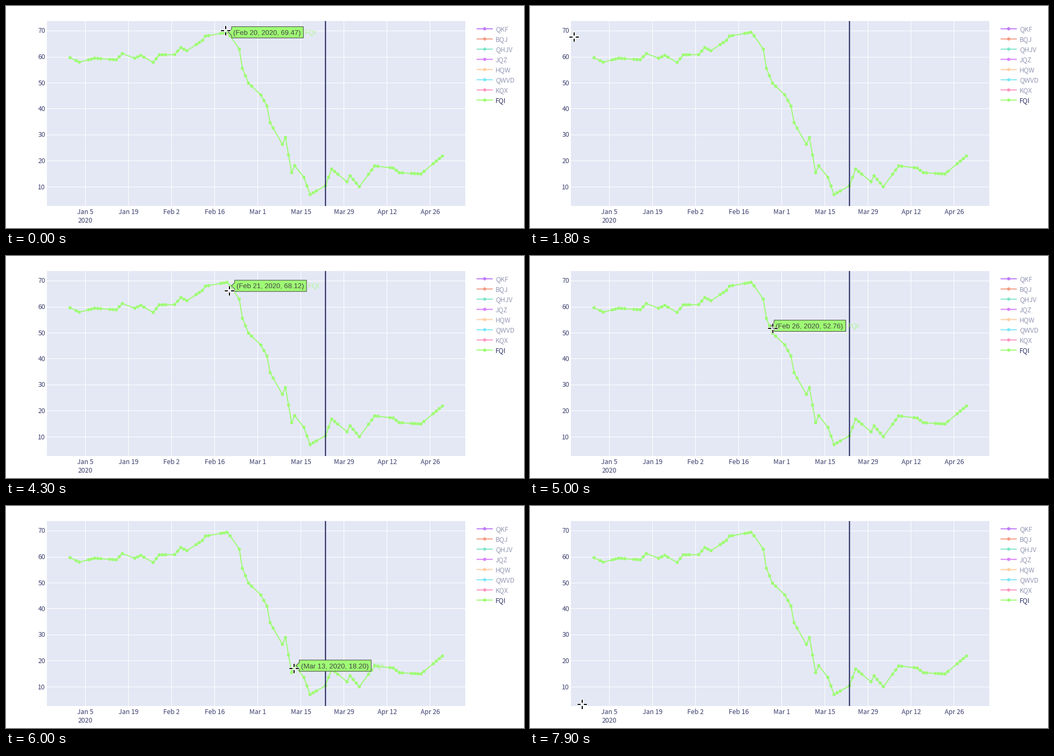
These frames come from a looping animation (962 by 414 pixels, 8000 ms). A matplotlib script:

```python
import math
import numpy as np
import matplotlib.pyplot as plt
from matplotlib.animation import FuncAnimation
from matplotlib.patches import Circle, Polygon, Rectangle

W, H, DPI = 962, 414, 64
PT = 72 / DPI  # points per pixel
LEFT, RIGHT, TOP, BOTTOM = 76, 853, 28, 373

GREEN, NAVY, INK = "#9ffb74", "#1f2259", "#3b3f6e"
AXIS_FONT, HOVER_FONT = "Noto Sans CJK JP", "Liberation Sans"
MONTHS = [("Dec", -30), ("Jan", 0), ("Feb", 31), ("Mar", 60), ("Apr", 91)]
SERIES = [("QKF", "#bf7bf8"), ("BQJ", "#f29d85"), ("QHJV", "#80e5cb"),
          ("JQZ", "#d880fb"), ("HQW", "#ffcfa3"), ("QWVD", "#7ce6f5"),
          ("KQX", "#fb97c4"), ("FQI", GREEN)]

# Turning points of the price as (day, price); day 0 is Dec 31
TURNS = [(0, 59.7), (3, 58), (8, 59.5), (15, 58.9), (17, 61.3), (21, 59.5),
         (23, 60.6), (27, 57.9), (29, 60.8), (34, 60.9), (36, 63.6),
         (38, 62.4), (43, 66.33), (44, 68.01), (51, 69.47), (52, 68.12),
         (55, 63), (56, 55.62), (58, 49.9), (62, 45.4), (64, 41.1),
         (65, 34.74), (69, 26.38), (70, 29), (72, 15.5), (73, 18.2),
         (76, 13.7), (78, 7.09), (83, 10.49), (85, 16.9), (90, 12),
         (91, 14.3), (94, 10.1), (99, 18.1), (105, 17.3), (107, 15.5),
         (114, 15), (121, 21.9)]
HOLIDAYS = {1, 20, 48, 101}

# Pointer moves: first frame, last frame, x, y, ease-out power
START = (408, 46)
MOVES = [(7, 7, 408, 49, 1), (11, 19, 66, 58, 1.4), (20, 20, 64, 66, 1),
         (23, 23, 64, 62, 1), (29, 37, 391, 60, 2.1), (42, 43, 415, 65, 1),
         (44, 47, 433, 101, 1), (49, 54, 487, 203, 1), (55, 57, 509, 266, 1),
         (58, 64, 570, 353, 1), (67, 68, 572, 349, 2), (71, 78, 95, 377, 1),
         (79, 79, 97, 370, 1)]


def day_x(day):
    return 147.5 + (day - 5) * 80.02 / 14


def price_y(price):
    return 337.5 - (price - 10) * 4.85


def crisp(v):
    return math.ceil(v) - 0.5


def date_text(day):
    month, start = [m for m in MONTHS if m[1] < day or m[0] == "Dec"][-1]
    return f"{month} {day - start}"


days = np.array([d for d in range(122)
                 if (d + 1) % 7 < 5 and d not in HOLIDAYS])
prices = np.interp(days, *zip(*TURNS))
px, py = day_x(days), price_y(prices)

fig = plt.figure(figsize=(W / DPI, H / DPI), dpi=DPI, facecolor="white")
ax = fig.add_axes([0, 0, 1, 1])
ax.set(xlim=(0, W), ylim=(H, 0))
ax.axis("off")


def line(xs, ys, color, width, z):
    return ax.plot(xs, ys, color=color, lw=width * PT, zorder=z, snap=False,
                   solid_capstyle="butt", solid_joinstyle="round")[0]


def dots(xs, ys, color, z):
    for x, y in zip(xs, ys):
        ax.add_patch(Circle((x, y), 3, fc=color, lw=0, zorder=z))


def label(x, y, s, color=INK, size=12.2, font=AXIS_FONT, z=3, ha="left"):
    return ax.text(x, y, s, color=color, fontsize=size * PT, family=font,
                   ha=ha, va="baseline", zorder=z)


def draw_chart():
    ax.add_patch(Rectangle((LEFT, TOP), RIGHT - LEFT, BOTTOM - TOP,
                           fc="#e4e8f5", lw=0, zorder=0))
    for day in range(5, 118, 14):
        x = day_x(day)
        line([crisp(x)] * 2, [TOP, BOTTOM], "white", 1, 1)
        label(x, 388, date_text(day), ha="center")
    label(day_x(5), 404, "2020", ha="center")
    for price in range(10, 71, 10):
        y = price_y(price)
        line([LEFT, RIGHT], [crisp(y)] * 2, "white", 1, 1)
        label(73, y + 4, price, ha="right")
    line(px, py, GREEN, 2, 2)
    dots(px, py, GREEN, 2)
    line([day_x(83)] * 2, [TOP, BOTTOM], NAVY, 2, 4)


def draw_legend():
    for i, (name, color) in enumerate(SERIES):
        y = 42.5 + 19 * i
        line([874, 904], [y, y], color, 2, 3)
        dots([889], [y], color, 3)
        active = color == GREEN
        label(909, y + 4.5, name, "#2b2e63" if active else "#9699b5")


draw_chart()
draw_legend()

# Hover label
bubble = Polygon([(0, 0)] * 3, fc=GREEN, ec="#444444", lw=PT, zorder=5,
                 snap=False)
ax.add_patch(bubble)
hover_text = label(0, 0, "", "#444444", 13, HOVER_FONT, 6)
hover_name = label(0, 0, SERIES[-1][0], "#b0f595", 13, HOVER_FONT, 6)
hover = (bubble, hover_text, hover_name)

# Crosshair pointer: white halo below black arms
arms = [(line([], [], color, width, z), dx, dy, near, far)
        for color, width, z, near, far in [("white", 4, 8, 2, 9.5),
                                           ("black", 2, 9, 3, 8.7)]
        for dx, dy in [(1, 0), (-1, 0), (0, 1), (0, -1)]]


def pointer(frame):
    x, y = START
    for first, last, to_x, to_y, power in MOVES:
        if frame < first:
            break
        p = min(1, (frame - first + 1) / (last - first + 1))
        ease = 1 - (1 - p) ** power
        x += (to_x - x) * ease
        y += (to_y - y) * ease
    return round(x), round(y)


def show_hover(x, y):
    dist = np.hypot(px - x, py - y)
    i = dist.argmin()
    near = dist[i] < 20
    for part in hover:
        part.set_visible(near)
    if not near:
        return
    x, y = px[i], py[i]
    hover_text.set_text(f"({date_text(days[i])}, 2020, {prices[i]:.2f})")
    left = x + 8.5
    right = left + hover_text.get_window_extent().width + 8
    top, bottom = y - 10.5, y + 10.5
    bubble.set_xy([(x + 2.5, y), (left, y - 6), (left, top), (right, top),
                   (right, bottom), (left, bottom), (left, y + 6)])
    hover_text.set_position((left + 3, y + 4.8))
    hover_name.set_position((right + 3, y + 4.8))


def update(frame):
    x, y = pointer(frame)
    show_hover(x, y)
    for arm, dx, dy, near, far in arms:
        arm.set_data([x + dx * near, x + dx * far],
                     [y + dy * near, y + dy * far])
    return [*hover, *(arm[0] for arm in arms)]


anim = FuncAnimation(fig, update, frames=80, interval=100, repeat=True,
                     repeat_delay=0, blit=False)
plt.show()
```
